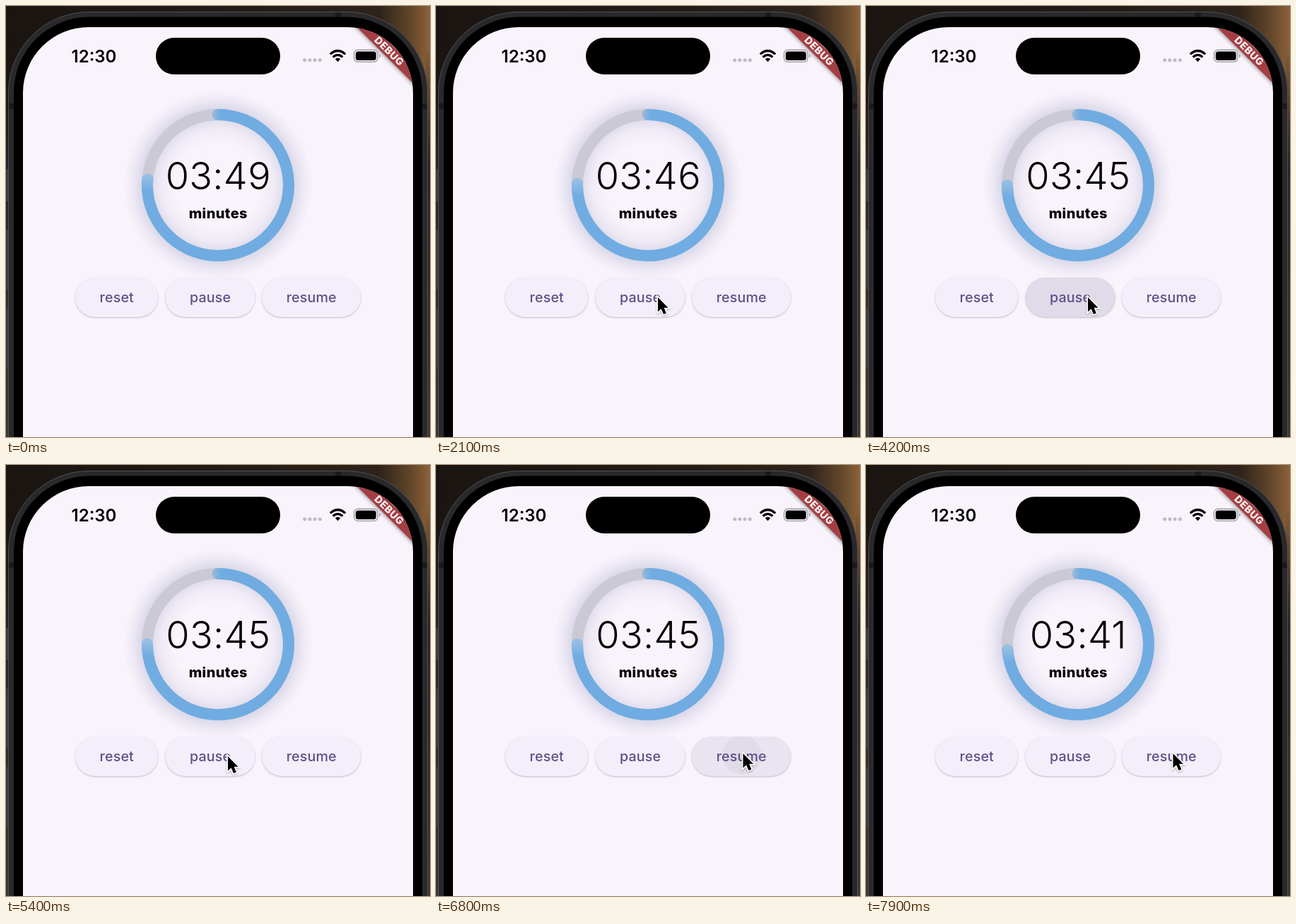
Recreate the animation shown at these times as an HTML page. Size 600 px wide and 611 px high, loop 8 s.

```html
<!DOCTYPE html>
<html lang="en">
<head>
<meta charset="utf-8">
<title>Countdown timer</title>
<style>
  html, body { margin: 0; width: 100%; height: 100%; overflow: hidden; background: #1c1714; }
  svg { display: block; width: 600px; height: 611px; }
  text { font-family: Inter, "Open Sans", sans-serif; text-anchor: middle; }
  .clock { font-size: 24px; font-weight: 600; }
  .time { font-size: 54px; font-weight: 300; letter-spacing: .3px; }
  .unit { font-size: 20px; font-weight: 800; letter-spacing: .4px; }
  .label { font-size: 19.66px; font-weight: 500; letter-spacing: .15px; fill: #5e5089; }
  .banner { font-size: 14.3px; font-weight: 800; letter-spacing: .5px; fill: #f8f1f3; }
  .button { filter: drop-shadow(0 1.5px 1.2px rgba(40, 30, 60, .27)); }
</style>
</head>
<body>
<svg viewBox="0 0 600 611">
  <defs>
    <linearGradient id="room">
      <stop offset="0" stop-color="#1b1512"/>
      <stop offset=".5" stop-color="#211a16"/>
      <stop offset=".88" stop-color="#2e231b"/>
      <stop offset=".95" stop-color="#5f4429"/>
      <stop offset="1" stop-color="#8c6239"/>
    </linearGradient>
    <linearGradient id="side" x2="0" y2="1">
      <stop offset="0" stop-color="#1c1714" stop-opacity="0"/>
      <stop offset=".3" stop-color="#252427"/>
      <stop offset="1" stop-color="#3a3735"/>
    </linearGradient>
    <radialGradient id="glow" gradientUnits="userSpaceOnUse" cx="300" cy="254" r="134">
      <stop offset=".45" stop-color="#8890b8" stop-opacity="0"/>
      <stop offset=".6" stop-color="#8890b8" stop-opacity=".09"/>
      <stop offset=".69" stop-color="#8890b8" stop-opacity=".22"/>
      <stop offset=".81" stop-color="#8890b8" stop-opacity=".26"/>
      <stop offset=".9" stop-color="#8890b8" stop-opacity=".11"/>
      <stop offset="1" stop-color="#8890b8" stop-opacity="0"/>
    </radialGradient>
    <linearGradient id="startFade" gradientUnits="userSpaceOnUse" x1="291" x2="304" y1="0" y2="0">
      <stop offset="0" stop-color="#9dbbdb"/>
      <stop offset="1" stop-color="#70ace1"/>
    </linearGradient>
    <linearGradient id="tipFade" gradientUnits="userSpaceOnUse" x1="283" x2="308" y1="0" y2="0">
      <stop offset="0" stop-color="#9cc3e6" stop-opacity="0"/>
      <stop offset="1" stop-color="#a0c2e3"/>
    </linearGradient>
    <clipPath id="screen"><rect x="24" y="30" width="552" height="800" rx="93"/></clipPath>
    <clipPath id="pauseShape"><rect x="225.5" y="385" width="127" height="56" rx="28"/></clipPath>
    <clipPath id="resumeShape"><rect x="362" y="385" width="140" height="56" rx="28"/></clipPath>
    <filter id="soft" x="-20%" y="-100%" width="140%" height="300%"><feGaussianBlur stdDeviation="3"/></filter>
  </defs>

  <!-- surroundings and phone body -->
  <rect width="600" height="611" fill="url(#room)"/>
  <path d="M0 60H6V611H0ZM594 60H600V611H594Z" fill="url(#side)"/>
  <path d="M0 231H4V277H0ZM0 317H4V402H0ZM0 428H4V514H0Z" fill="#3b3b3e"/>
  <rect x="3.5" y="8.5" width="593" height="850" rx="114" fill="#29292b" stroke="#505053"/>
  <path d="M4 142H11M589 142H596M470 9V16" stroke="#1a1a1c" stroke-width="8"/>
  <rect x="11" y="15.5" width="578" height="830" rx="107"/>

  <g clip-path="url(#screen)">
    <rect x="24" y="30" width="552" height="581" fill="#f9f3fb"/>
    <g transform="translate(576 30) rotate(45)">
      <rect x="-64" y="39.3" width="128" height="16.9" opacity=".6" filter="url(#soft)"/>
      <rect x="-64" y="39.3" width="128" height="16.9" fill="#a53e42"/>
      <text class="banner" x=".3" y="52.9">DEBUG</text>
    </g>
  </g>

  <!-- status bar -->
  <text class="clock" x="124.5" y="79.5">12:30</text>
  <rect x="212" y="45" width="176" height="52" rx="26"/>
  <path d="M422.7 76.7h.01M429.9 76.7h.01M437.1 76.7h.01M444.3 76.7h.01" stroke="#c0bac4" stroke-width="5" stroke-linecap="round"/>
  <g fill="none" stroke="#000" stroke-width="3.3">
    <path d="M458.8 68.4Q469.5 58.6 480.2 68.4"/>
    <path d="M462.6 72.4Q469.5 66.4 476.4 72.4"/>
  </g>
  <path d="M465.8 75.3Q469.5 72.4 473.2 75.3L469.5 79.3Z"/>
  <rect x="492.5" y="62.3" width="33.5" height="17" rx="5.5" fill="none" stroke="#a29da6" stroke-width="1.4"/>
  <rect x="494.8" y="64.6" width="28.9" height="12.4" rx="3.5"/>
  <path d="M528 68v5.6q2-.8 2-2.8t-2-2.8" fill="#a29da6"/>

  <!-- dial -->
  <circle cx="300" cy="254" r="134" fill="url(#glow)"/>
  <g fill="none" stroke-width="16" stroke-linecap="round">
    <circle cx="300" cy="254" r="100" stroke="#cbc9d4"/>
    <path id="arc" stroke="#70ace1"/>
    <path id="tip" d="M286 155A100 100 0 0 1 300 154" stroke="url(#tipFade)"/>
  </g>
  <path d="M304 146H300A8 8 0 0 0 300 162H304Z" fill="url(#startFade)"/>
  <text class="time" id="time" x="300.3" y="260"></text>
  <text class="unit" x="300.3" y="300.5">minutes</text>

  <!-- buttons -->
  <g class="button" fill="#f4eefa">
    <rect x="98" y="385" width="117" height="56" rx="28"/>
    <rect x="225.5" y="385" width="127" height="56" rx="28"/>
    <rect x="362" y="385" width="140" height="56" rx="28"/>
  </g>
  <g id="pauseInk" clip-path="url(#pauseShape)" fill="#676184" fill-opacity=".07">
    <rect x="225" y="385" width="128" height="56"/><circle cx="312" cy="411"/>
  </g>
  <g id="resumeInk" clip-path="url(#resumeShape)" fill="#676184" fill-opacity=".07">
    <rect x="362" y="385" width="140" height="56"/><circle cx="433" cy="411"/>
  </g>
  <text class="label" x="156.8" y="420">reset</text>
  <text class="label" x="289" y="420">pause</text>
  <text class="label" x="432.2" y="420">resume</text>

  <path id="cursor" d="M0 0V20.5L4.6 16.2L8 24L11.9 22.4L8.6 14.8H14.6Z" stroke="#fff" stroke-width="3.4" paint-order="stroke"
    style="filter:drop-shadow(0 1px 1.2px rgba(0,0,0,.3))"/>
</svg>
<script>
const LOOP = 8000, TOTAL = 300;
const ticks = [500, 1500, 2050, 3100, 7000, 7300, 7600, 7850];
const path = [[300, 420, 640], [900, 310, 459], [1200, 310, 459], [1700, 314, 413], [5600, 314, 413], [6200, 434.5, 409]];
const el = id => document.getElementById(id);
const clamp = v => Math.min(1, Math.max(0, v));
const ease = v => v * v * (3 - 2 * v);

function cursorAt(t) {
  let i = 0;
  while (i < path.length - 2 && t > path[i + 1][0]) i++;
  const [a, b] = [path[i], path[i + 1]];
  const k = ease(clamp((t - a[0]) / (b[0] - a[0])));
  return [a[1] + (b[1] - a[1]) * k, a[2] + (b[2] - a[2]) * k];
}

function press(id, t, down, up) {
  const ink = el(id), age = t - down;
  ink.setAttribute("opacity", age < 0 ? 0 : clamp(age / 80) * (1 - clamp((t - up) / 200)));
  ink.lastElementChild.setAttribute("r", Math.max(0, Math.min(130, 5 + age * .22 + Math.max(0, age - 100) * .4)));
}

function draw(now) {
  const t = now % LOOP;
  const left = 229 - ticks.filter(k => t >= k).length;
  const turn = left / TOTAL, angle = turn * 2 * Math.PI;
  const label = `0${Math.floor(left / 60)}:${String(left % 60).padStart(2, "0")}`;
  if (el("time").textContent !== label) el("time").textContent = label;
  el("arc").setAttribute("d", `M300 154A100 100 0 1 1 ${300 + 100 * Math.sin(angle)} ${254 - 100 * Math.cos(angle)}`);
  el("tip").setAttribute("transform", `rotate(${turn * 360} 300 254)`);
  press("pauseInk", t, 3850, 4300);
  press("resumeInk", t, 6700, 6900);
  el("cursor").setAttribute("transform", `translate(${cursorAt(t)})`);
}

const start = performance.now();
function loop() {
  draw(performance.now() - start);
  requestAnimationFrame(loop);
}
loop();
</script>
</body>
</html>
```
